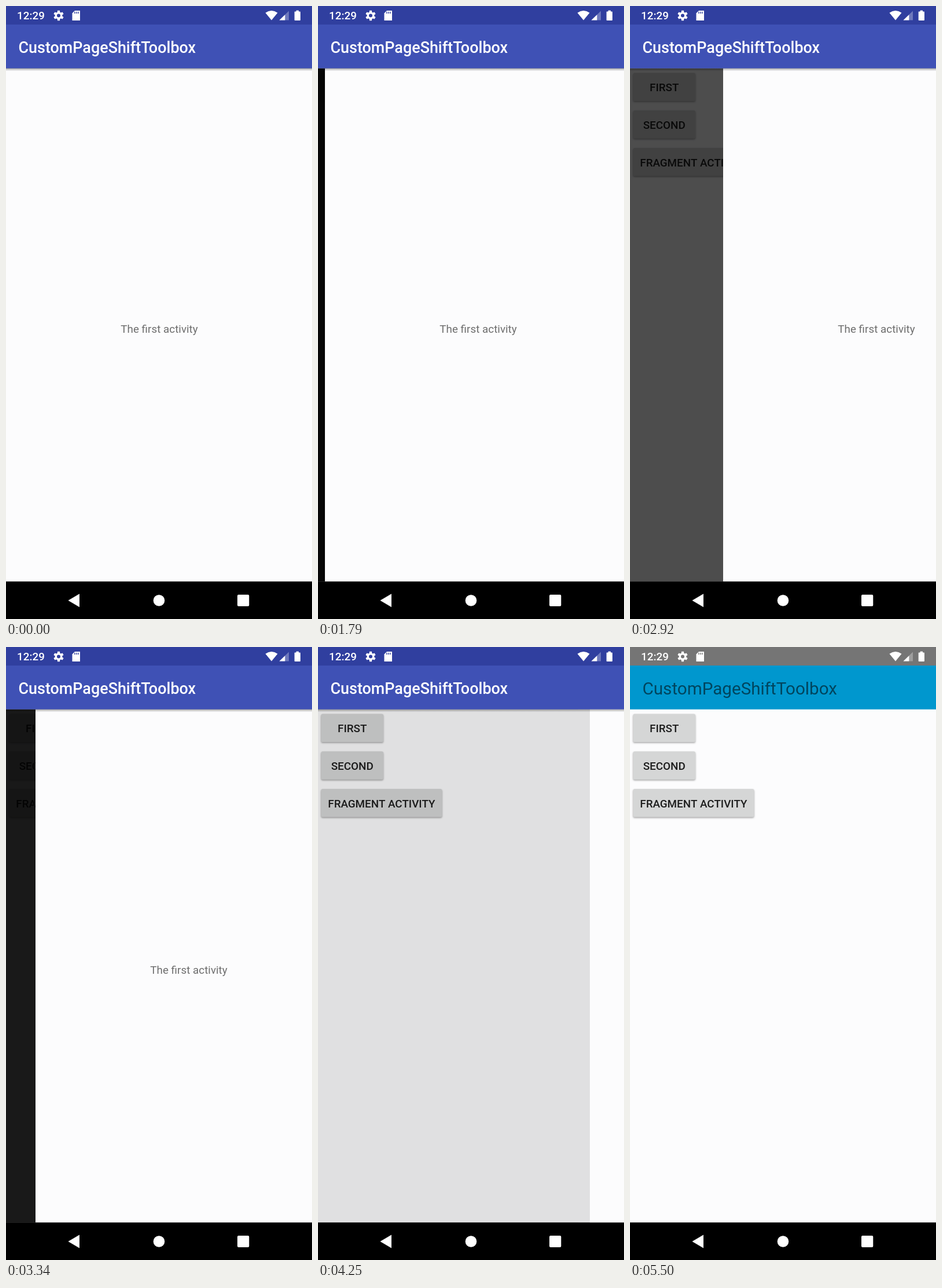
Recreate the animation shown at these times as an HTML page with a canvas. Size 529 px wide and 1058 px high, loop 5.54 s.

```html
<!DOCTYPE html>
<html lang="en">
<head>
<meta charset="utf-8">
<title>Swipe back</title>
<style>
html, body { margin: 0; width: 100%; height: 100%; overflow: hidden; background: #000; }
canvas { display: block; width: 100vw; height: 100vh; }
</style>
</head>
<body>
<canvas id="stage" width="529" height="1058"></canvas>
<script>
const W = 529, H = 1058, LOOP = 5540, FPS = 24;
const DP = W / 392.73;
const STATUS_BOTTOM = 32, BAR_BOTTOM = 107.5, NAV_TOP = 993.4;
const FINISH = 4780;
const TITLE = 'CustomPageShiftToolbox';
const PAGE = '#fcfcfd';
const ctx = document.getElementById('stage').getContext('2d');

// Finger drag: [time in ms, panel offset in px]
const drag = [[1580, 0], [2290, 101], [2640, 255], [2920, 160], [3340, 50],
  [3400, 46], [3840, 253], [4250, 470], [4400, W]];
const slopes = drag.slice(1).map(([t, x], i) => (x - drag[i][1]) / (t - drag[i][0]));
const tangents = drag.map((_, i) => {
  const a = slopes[i - 1] || 0, b = slopes[i] || 0;
  return a * b > 0 ? 2 * a * b / (a + b) : 0;
});

// Monotone cubic interpolation of the drag path
function panelOffset(t) {
  if (t <= drag[0][0]) return 0;
  const i = drag.findIndex(([end]) => t < end) - 1;
  if (i < 0) return W;
  const [t0, x0] = drag[i], [t1, x1] = drag[i + 1];
  const d = t1 - t0, u = (t - t0) / d, v = 1 - u;
  return v * v * (1 + 2 * u) * x0 + u * u * (3 - 2 * u) * x1
    + u * v * d * (v * tangents[i] - u * tangents[i + 1]);
}

function rect(x, y, w, h, color) {
  ctx.fillStyle = color;
  ctx.fillRect(x, y, w, h);
}

function roundRect(x, y, w, h, r, color) {
  ctx.fillStyle = color;
  ctx.beginPath();
  ctx.roundRect(x, y, w, h, r);
  ctx.fill();
}

function polygon(color, ...points) {
  ctx.fillStyle = color;
  ctx.beginPath();
  points.forEach(([x, y]) => ctx.lineTo(x, y));
  ctx.closePath();
  ctx.fill();
}

function text(str, x, y, sp, weight, color, align = 'left') {
  ctx.font = `${weight} ${sp * DP}px Roboto, sans-serif`;
  ctx.textAlign = align;
  ctx.fillStyle = color;
  ctx.fillText(str, x, y);
}

function button(label, row, right) {
  const x = 5.4, y = 115.6 + row * 48 * DP, w = right - x;
  ctx.save();
  ctx.shadowColor = 'rgba(0,0,0,.35)';
  ctx.shadowBlur = 3;
  ctx.shadowOffsetY = 1.5;
  roundRect(x, y, w, 36 * DP, 2 * DP, '#d5d6d6');
  ctx.restore();
  text(label, x + w / 2, y + 31.8, 14, 500, '#1c1c1c', 'center');
}

function menuPage() {
  rect(0, BAR_BOTTOM, W, NAV_TOP - BAR_BOTTOM, PAGE);
  button('FIRST', 0, 113);
  button('SECOND', 1, 113);
  button('FRAGMENT ACTIVITY', 2, 214.4);
}

function gear(cx, cy) {
  ctx.fillStyle = '#fff';
  ctx.beginPath();
  for (let i = 0; i < 6; i++) {
    const mid = Math.PI / 2 + i * Math.PI / 3;
    [[-.38, 6.3], [-.22, 9], [.22, 9], [.38, 6.3]].forEach(([a, r]) =>
      ctx.lineTo(cx + r * Math.cos(mid + a), cy + r * Math.sin(mid + a)));
  }
  ctx.closePath();
  ctx.moveTo(cx + 3, cy);
  ctx.arc(cx, cy, 3, 0, 7);
  ctx.fill('evenodd');
}

function statusBar(color) {
  rect(0, 0, W, STATUS_BOTTOM, color);
  text('12:29', 19, 23.2, 14, 500, '#fff');
  gear(91, 16.5);
  polygon('#fff', [119, 8], [128, 8], [128, 25], [114.5, 25], [114.5, 12.5]);
  [118.2, 121.2, 124.2].forEach(x => rect(x, 9.8, 1.4, 3.4, color));

  ctx.fillStyle = '#fff';
  ctx.beginPath();
  ctx.moveTo(459, 24.5);
  ctx.lineTo(448.5, 11.8);
  ctx.quadraticCurveTo(459, 4.4, 469.5, 11.8);
  ctx.fill();
  polygon('rgba(255,255,255,.3)', [489, 8.5], [489, 24.5], [472.5, 24.5]);
  polygon('#fff', [482.4, 14.9], [482.4, 24.5], [472.5, 24.5]);
  roundRect(498.7, 9.4, 10.3, 15.6, 1, '#fff');
  rect(501.7, 7.6, 4.3, 2.5, '#fff');
}

function navBar() {
  rect(0, NAV_TOP, W, H - NAV_TOP, '#000');
  polygon('#fff', [107.5, 1026], [127, 1014.5], [127, 1037.5]);
  ctx.beginPath();
  ctx.arc(264.5, 1026, 9.8, 0, 7);
  ctx.fill();
  roundRect(400, 1016, 20.3, 20, 2, '#fff');
}

function toolbar(color) {
  rect(0, STATUS_BOTTOM, W, BAR_BOTTOM - STATUS_BOTTOM, color);
}

function swipeScreen(x) {
  menuPage();
  rect(0, BAR_BOTTOM, W, NAV_TOP - BAR_BOTTOM, `rgba(0,0,0,${1 - x / W})`);
  rect(x, BAR_BOTTOM, W, NAV_TOP - BAR_BOTTOM, PAGE);
  text('The first activity', x + 265, 563.8, 14, 400, '#6e6e6e', 'center');
  const shade = ctx.createLinearGradient(0, BAR_BOTTOM, 0, BAR_BOTTOM + 5);
  shade.addColorStop(0, 'rgba(0,0,0,.32)');
  shade.addColorStop(1, 'rgba(0,0,0,0)');
  rect(0, BAR_BOTTOM, W, 5, shade);
  statusBar('#303f9f');
  toolbar('#3f51b5');
  text(TITLE, 21.5, 81, 20, 500, '#fff');
}

function menuScreen() {
  menuPage();
  statusBar('#757575');
  toolbar('#0097ce');
  text(TITLE, 21.5, 82, 22, 400, 'rgba(0,0,0,.54)');
}

function draw(now) {
  const t = Math.floor((now % LOOP) * FPS / 1000 + .1) * 1000 / FPS;
  if (t < FINISH) swipeScreen(Math.round(panelOffset(t)));
  else menuScreen();
  navBar();
}

const start = performance.now();
function tick() {
  draw(performance.now() - start);
  requestAnimationFrame(tick);
}
tick();
</script>
</body>
</html>
```
